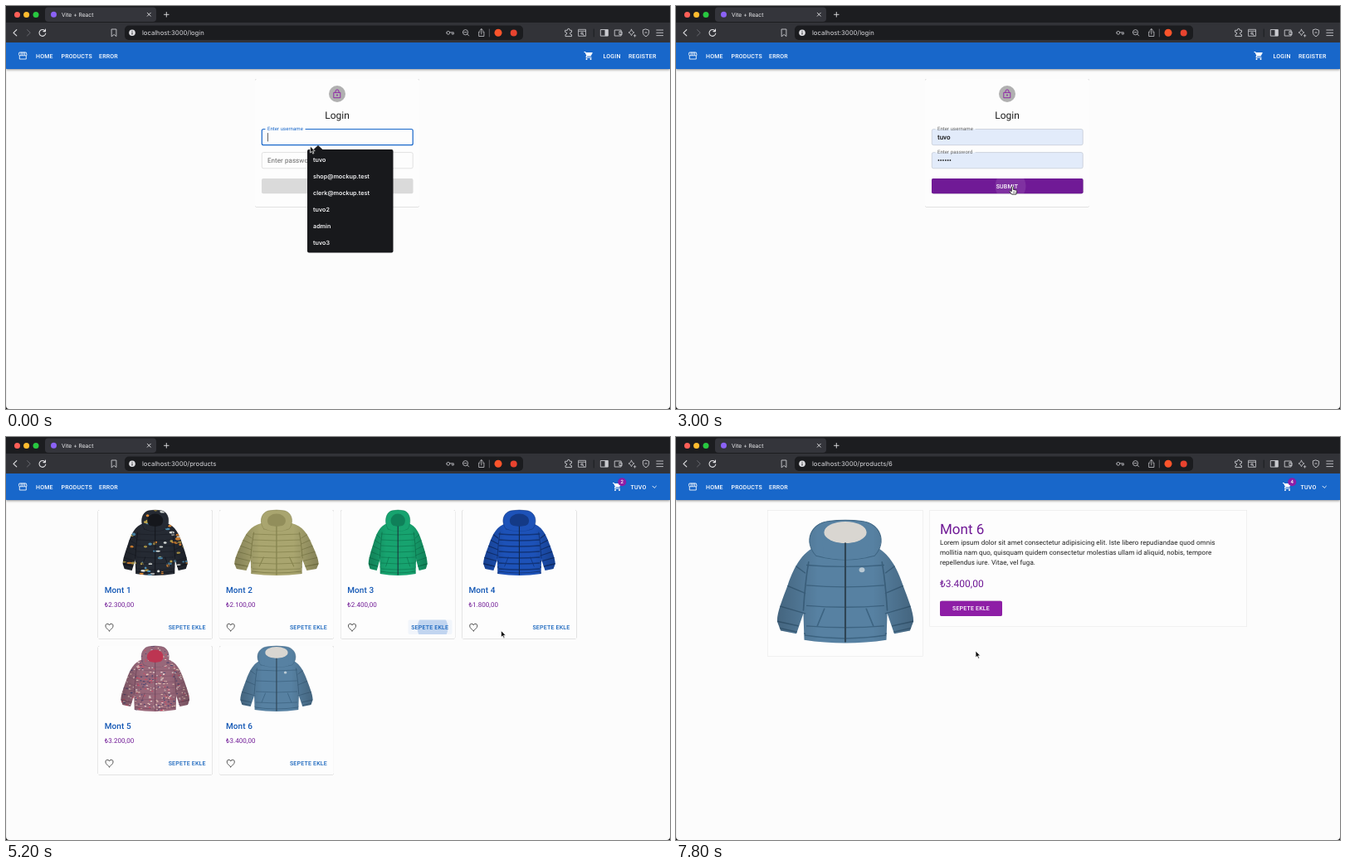
Animation of 800x486 px, one loop 8000 ms. Source, as an HTML page:

```html
<!DOCTYPE html>
<html lang="en">
<head>
<meta charset="utf-8">
<title>Shop walkthrough</title>
<style>
html, body { margin: 0; width: 100%; height: 100%; overflow: hidden; background: #111; }
svg { display: block; width: 100%; height: 100%; font-family: Roboto, "Noto Sans", sans-serif; text-rendering: geometricPrecision; }
.ui { font-family: Inter, "Noto Sans", sans-serif; }
.btn { font-size: 7px; font-weight: 500; letter-spacing: .2px; }
.card { filter: drop-shadow(0 .8px .7px rgba(0,0,0,.42)); }
.bar { filter: drop-shadow(0 1.3px 1.6px rgba(0,0,0,.42)); }
.line { fill: none; stroke-linecap: round; stroke-linejoin: round; }
</style>
</head>
<body>
<svg viewBox="0 0 800 486" preserveAspectRatio="none">
  <defs>
    <linearGradient id="shade">
      <stop offset="0" stop-opacity=".22"/><stop offset=".3" stop-opacity="0"/>
      <stop offset=".7" stop-opacity="0"/><stop offset="1" stop-opacity=".22"/>
    </linearGradient>
    <g id="coats"></g>
  </defs>
  <g id="page"></g>
  <g id="chrome"></g>
  <g id="mouse"></g>
</svg>
<script>
const LOOP = 8000, STEP = 200;
const USER = 'tuvo';
const BLUE = '#1867ca', PURPLE = '#8e1ea6', DEEP = '#701a96';
const $ = id => document.getElementById(id);

// Times of the main events
const AT = { fill: 600, focus: 800, pass: 1800, submit: 2800, shop: 3400, detail: 7600 };
const CLICKS = [[4000, 1, 364], [5000, 2, 514], [5600, 3, 650], [6800, 0, 233]];
const PATH = [
  [0, 366.5, 169], [200, 366.5, 169], [400, 375, 185], [600, 375, 185], [800, 368.5, 194],
  [1600, 368.5, 194], [2400, 405, 217.5], [3000, 405, 217.5], [3600, 353, 192.5],
  [4000, 364, 231], [4200, 364, 231], [4800, 512, 231], [5000, 514, 231], [5200, 596.5, 233.5],
  [5600, 650, 231], [5800, 650, 231], [6600, 233, 233.5], [6800, 233, 233.5],
  [7400, 325, 300], [7600, 325, 300], [7800, 361, 258], [8000, 361, 258]
];

// Drawing helpers
const text = (x, y, s, size, fill, more = '') =>
  `<text x="${x}" y="${y}" font-size="${size}" fill="${fill}" ${more}>${s}</text>`;
const label = (x, y, s, fill, more = '') => text(x, y, s, 7, fill, 'class="btn" ' + more);
const rect = (x, y, w, h, fill, r = 0, more = '') =>
  `<rect x="${x}" y="${y}" width="${w}" height="${h}" rx="${r}" fill="${fill}" ${more}/>`;
const dot = (x, y, r, fill, more = '') => `<circle cx="${x}" cy="${y}" r="${r}" fill="${fill}" ${more}/>`;
const line = (d, stroke, w = 1, more = '') =>
  `<path class="line" d="${d}" stroke="${stroke}" stroke-width="${w}" ${more}/>`;
const shape = (d, fill, more = '') => `<path d="${d}" fill="${fill}" ${more}/>`;
const at = (x, y, s, body) => `<g transform="translate(${x} ${y}) scale(${s})">${body}</g>`;
const MID = 'text-anchor="middle"';
const inside = (p, x, y, w, h) => p.x >= x && p.x <= x + w && p.y >= y && p.y <= y + h;

// Jackets, 80 units high and centred on x = 0
const COATS = [
  { w: 1, hood: 16.5, c: '#252a33', dark: '#14161d', inner: '#15171c', dots: ['#e08a35', '#d9dedb', '#4f8fb4', '#b9a04a'], n: 75, size: 2 },
  { w: 1.3, hood: 19, c: '#a9a56f', dark: '#87844f', inner: '#928e5b' },
  { w: .91, hood: 15, c: '#17a36f', dark: '#0d7850', inner: '#0f8059', zip: '#1d2b38' },
  { w: 1.11, hood: 20, c: '#1d52b8', dark: '#11347a', inner: '#143a86', zip: '#12284f', seam: 1.3 },
  { w: 1.06, hood: 17, c: '#98687a', dark: '#754a60', inner: '#bd3552', dots: ['#efdfda', '#cf4a62', '#4b4672', '#e6c2b4'], n: 480, size: .9 },
  { w: 1.12, hood: 23.5, c: '#5781a2', dark: '#3d6482', inner: '#d9d6d1', zip: '#2f4454', gap: 13, open: 8 }
];
const BODY = 'M-14 16C-24 19-29 29-33 42-36 51-39 59-39 65L-37 71-28 73-24 60-23.5 77Q0 81 23.5 77L24 60 28 73 37 71 39 65C39 59 36 51 33 42 29 29 24 19 14 16Z';

function jacket(k, i) {
  const h = k.hood / k.w, mid = k.open || 13;
  const hood = `M${-h * .8} 23C${-h * 1.15} 14 ${-h * .95} 2 ${-h * .45} .8Q0-.6 ${h * .45} .8C${h * .95} 2 ${h * 1.15} 14 ${h * .8} 23Q0 28 ${-h * .8} 23Z`;
  let seed = 11 + i, spots = '', quilt = '';
  const rnd = () => (seed = seed * 16807 % 2147483647) / 2147483647;
  for (let n = 0; n < (k.n || 0); n++)
    spots += `<ellipse cx="${rnd() * 78 - 39}" cy="${rnd() * 80}" rx="${(.7 + rnd()) * k.size}" ry="${(.5 + rnd() * .4) * k.size}" fill="${k.dots[n % 4]}"/>`;
  for (let y = 29; y < 75; y += k.gap || 7) {
    const out = 25 + (y - 26) * .36;
    quilt += `M-22 ${y}Q0 ${y + 2} 22 ${y}M${-out - 3} ${y}L-23 ${y + 5}M${out + 3} ${y}L23 ${y + 5}`;
  }
  return `<clipPath id="clip${i}"><path d="${BODY}"/><path d="${hood}"/></clipPath>
    <g id="coat${i}" transform="scale(${k.w} 1)">
    ${shape(BODY, k.c)}${shape(hood, k.c)}
    <g clip-path="url(#clip${i})">${spots}
      ${line(quilt, k.dark, k.dots ? .4 : k.seam || .7)}
      ${line('M-21 27Q-23 40-24 58M21 27Q23 40 24 58M-39 65-27 68M39 65 27 68M-23 74Q0 78 23 74', k.dark, .8)}
      ${line('M-12 57-16 68M12 57 16 68', k.dark, .8)}
      ${rect(-39, 0, 78, 80, 'url(#shade)')}
    </g>
    ${line(hood, k.dark, .5)}
    <ellipse cx="0" cy="${mid}" rx="${h * .58}" ry="${k.open ? 7 : 8.5}" fill="${k.inner}"/>
    ${shape(`M${-h * .62} ${mid + 4}Q0 ${mid + 10} ${h * .62} ${mid + 4}L${h * .6} 24Q0 27 ${-h * .6} 24Z`, k.c)}
    ${line(`M0 ${mid + 7}V78`, k.zip || k.dark, 1)}
    ${i === 5 ? dot(9.5, 32, 1.6, '#b9c9d4') : ''}</g>`;
}

// Icons on a 24 unit grid
const CART = 'M7 18a2 2 0 1 0 0 4 2 2 0 0 0 0-4zM1 2v2h2l3.6 7.6-1.4 2.4C4.5 15.3 5.5 17 7 17h12v-2H7.4l1-2h7.5q1.2 0 1.8-1L21.3 5.5Q21.7 4 20.4 4H5.2L4.3 2zm16 16a2 2 0 1 0 0 4 2 2 0 0 0 0-4z';
const HEART = 'M12 20C6 14.8 3 12 3 8.5A4.5 4.5 0 0 1 12 6.5 4.5 4.5 0 0 1 21 8.5C21 12 18 14.8 12 20Z';
const STORE = 'M4 4h16l1.500 6q-.5 2-2.500 2-2 0-2.500-1.500Q16 12 14.300 12 12.500 12 12 10.500 11.500 12 9.700 12 8 12 7.500 10.500 7 12 5 12 3 12 2.500 10zM4 12v8h16v-8M12 4v7M8 4l-.5 7M16 4l.5 7'.replace(/00\b/g, '');

function chrome(url, key) {
  const g = '#c9cacf';
  const glass = (x, y, r) => `M${x - r} ${y}a${r} ${r} 0 1 0 ${2 * r} 0a${r} ${r} 0 1 0 ${-2 * r} 0M${x + r * .7} ${y + r * .7}l2 2`;
  return rect(0, 0, 800, 44, '#323338') + rect(0, 0, 800, 20, '#1c1d20') +
    rect(47, 1.5, 134, 17.5, '#34353b', 4) +
    dot(13.5, 10.5, 3.5, '#ff5f57') + dot(24.6, 10.5, 3.5, '#febc2e') + dot(36, 10.5, 3.5, '#28c840') +
    dot(57.5, 10.3, 3.5, '#8b62f5') +
    text(67, 12.7, 'Vite + React', 6.7, '#eeeef0', 'class="ui"') +
    line('M170.3 8.2l4 4m0-4l-4 4M190.5 10.3h5.6m-2.8-2.8v5.6', '#e2e2e5', .9) +
    rect(143, 23.5, 480, 17.5, '#1b1c1f', 5) +
    line('M12.8 28.7 9 32.3l3.8 3.6', '#e2e2e5', 1.1) +
    line('M25.5 28.7l3.8 3.6-3.8 3.6', '#67686e', 1) +
    line('M46.8 29.8a3.9 3.9 0 1 0 1 3.2M47.5 28v2.6h-2.6', '#e2e2e5', 1.1) +
    line('M127.5 28h5.4v8.6l-2.7-2.2-2.7 2.2z', g, .9) +
    dot(152, 32.3, 3.8, '#dedee2') + line('M152 32v2.2M152 30.3v.1', '#1b1c1f', .9) +
    text(164, 35, 'localhost:3000/' + url, 7.7, '#d8d8dc', 'class="ui"') +
    (key ? line('M530.8 32.3a1.9 1.9 0 1 0 3.8 0a1.9 1.9 0 1 0-3.8 0M534.6 31.8h4.7v2.2h-2v-1.2', g, .8) : '') +
    line(glass(553.5, 31.7, 3.1) + 'M552 31.7h3', g, .8) +
    line('M571 31h-1.3v5.5h6.2V31h-1.3M572.8 34v-6.3m-1.8 1.7 1.8-1.8 1.8 1.8', g, .8) +
    line('M582.3 28v9', '#77787d', .7) +
    dot(593, 32.3, 4.5, '#fb542b') + dot(611.7, 32.5, 4, '#e8432f') +
    line('M674 29.3h2.3q0-2 1.5-2t1.5 2h2.2v2.3q-2 0-2 1.5t2 1.5v2H674v-2.2q1.8 0 1.8-1.4T674 31.5z', g, .9) +
    line('M690 28.3h8.5v8H690zM690 30.3h8.5' + glass(694, 33, 1.2), g, .8) +
    line('M708.2 28v9', '#17181b', .8) +
    line('M716.7 28.5h8.6v7.6h-8.6z', g, .9) + rect(721.5, 28.5, 3.8, 7.6, g) +
    line('M733.6 29h7.5v7h-7.5zM741.1 31h1v3.5h-3.2V31z', g, .9) +
    line('M753.5 28.3q.5 3 3.5 3.7-3 .7-3.5 3.7-.5-3-3.5-3.7 3-.7 3.5-3.7zM757.6 34.5v2.6m-1.3-1.3h2.6', g, .8) +
    line('M771 28l3.6 1.2v3q0 3-3.6 4.6-3.6-1.6-3.6-4.6v-3zM769.8 32h2.4', g, .9) +
    line('M783.8 29h7.8m-7.8 3.3h7.8m-7.8 3.3h7.8', g, .9);
}

function navBar(t) {
  const logged = t >= AT.shop;
  const count = CLICKS.filter(c => t >= c[0] + 200).length;
  let s = `<g class="bar">${rect(0, 44, 800, 32, BLUE)}</g>` +
    at(14.3, 54, .5, line(STORE, '#fff', 1.7)) +
    label(36, 62.5, 'HOME', '#fff') + label(66.5, 62.5, 'PRODUCTS', '#fff') + label(112, 62.5, 'ERROR', '#fff') +
    at(logged ? 730.5 : 696, 54, .5, shape(CART, '#fff'));
  if (!logged) return s + label(719.5, 62.5, 'LOGIN', '#fff') + label(750, 62.5, 'REGISTER', '#fff');
  if (count) s += dot(742.3, 54.2, 5, PURPLE) + text(742.3, 56.4, count, 6, '#fff', MID + ' font-weight="500"');
  return s + label(752.5, 62.5, USER.toUpperCase(), '#fff') + line('M779 59.2l2.2 2.2 2.2-2.2', '#fff', .9);
}

function field(y, name, value, focus, caret) {
  const up = focus || value, x = 308.3, r = 490.2, b = y + 19.2;
  return (value ? rect(x, y, r - x, 19.2, '#e2ebfa', 2) : '') +
    line(`M${up ? 361 : 312} ${y}H${r - 2}q2 0 2 2V${b - 2}q0 2-2 2H${x + 2}q-2 0-2-2V${y + 2}q0-2 2-2H312`,
      focus ? BLUE : value ? '#b9c0cc' : '#cfcfcf', focus ? 1.2 : .6) +
    (up ? text(315, y + 1.6, name, 6, focus ? BLUE : '#666', 'letter-spacing=".06"')
        : text(315, y + 12.4, name, 8, '#666', 'letter-spacing=".07"')) +
    (value ? text(315, y + 12.3, value, 8, '#111', 'font-weight="500"') : '') +
    (caret ? line(`M315.5 ${y + 5}v9.5`, '#222', .7) : '');
}

function ripple(id, x, y, dt, color, alpha, box) {
  if (dt < 0 || dt > 600) return '';
  const fade = dt <= 300 ? 1 : 1 - (dt - 300) / 300;
  return `<clipPath id="${id}">${rect(...box, '#000', 2)}</clipPath>` +
    dot(x, y, 8 + dt * .0525, color, `opacity="${alpha * fade}" clip-path="url(#${id})"`);
}

function login(t, p) {
  const filled = t >= AT.fill, ready = t >= AT.pass, box = [308, 208, 182.5, 18.3];
  const passFocus = t >= AT.focus && t < AT.submit;
  let s = `<g class="card">${rect(300, 88, 198, 154.5, '#fdfdfd', 2)}</g>` +
    dot(399, 106, 10, '#b0b0b0') +
    line('M395.2 104.3h7.6v6.4h-7.6zM397 104.3v-1.3q0-2.1 2-2.1t2 2.1v1.3', PURPLE, .9) + dot(399, 107.5, .9, PURPLE) +
    text(399, 136.2, 'Login', 12, '#1d1d1d', MID) +
    field(148.5, 'Enter username', filled ? USER : '', t < AT.focus, !filled && t < 500) +
    field(176.6, 'Enter password', ready ? '••••••' : '', passFocus, passFocus && !ready && (t - AT.focus) % 1000 < 500);
  s += ready
    ? `<g class="card">${rect(...box, inside(p, ...box) ? DEEP : PURPLE, 2)}</g>` + ripple('rs', 403, 217, t - AT.submit, '#fff', .1, box)
    : rect(...box, '#dadada', 2);
  s += label(399, 219.7, 'SUBMIT', ready ? '#fff' : '#a3a3a3', MID);
  if (!filled) {
    s += rect(363, 173, 103.5, 124.5, '#18191c', 2) + shape('M370 173.5l6-5.5 6 5.5z', '#18191c');
    [USER, 'shop@mockup.test', 'clerk@mockup.test', USER + '2', 'admin', USER + '3'].forEach((v, i) =>
      s += text(370, 188.2 + i * 20, v, 7.2, '#f1f1f3', 'class="ui" font-weight="600"'));
  }
  return s;
}

const PRICES = ['2.300', '2.100', '2.400', '1.800', '3.200', '3.400'];
const cardAt = i => ({ x: 110.7 + i % 4 * 146.25, y: i < 4 ? 88 : 252 });
const buyBox = c => [c.x + 81.3, c.y + 132.5, 53, 17.5];

function products(t, p) {
  return PRICES.map((price, i) => {
    const c = cardAt(i), box = buyBox(c);
    const click = CLICKS.find(k => k[1] === i && t >= k[0] && t < k[0] + 600);
    return `<g class="card">${rect(c.x, c.y, 138, 155.5, '#fdfdfd', 2)}</g>` +
      at(c.x + 69, c.y, 1, `<use href="#coat${i}"/>`) +
      text(c.x + 8, c.y + 99.5, 'Mont ' + (i + 1), 10, '#1156b4', 'font-weight="500" letter-spacing=".075"') +
      text(c.x + 8, c.y + 116.5, `₺${price},00`, 8, DEEP, 'letter-spacing=".05"') +
      at(c.x + 7.8, c.y + 135.8, .5, line(HEART, '#555', 2)) +
      (click || inside(p, ...box) ? rect(...box, BLUE, 2, 'opacity=".05"') : '') +
      (click ? ripple('rb' + i, click[2], c.y + 142, t - click[0], BLUE, .22, box) : '') +
      label(c.x + 85, c.y + 144.3, 'SEPETE EKLE', '#1865bd');
  }).join('');
}

const DETAIL_BTN = [318, 197.7, 75, 18.3];
const LOREM = [
  'Lorem ipsum dolor sit amet consectetur adipisicing elit. Iste libero repudiandae quod omnis',
  'mollitia nam quo, quisquam quidem consectetur molestias ullam id aliquid, nobis, tempore',
  'repellendus iure. Vitae, vel fuga.'
];

function detail() {
  const edge = 'stroke="#e9e9e9" stroke-width=".6"';
  return rect(110.5, 88.3, 187, 176.3, '#fdfdfd', 0, edge) + rect(305.7, 88.3, 382, 140, '#fdfdfd', 0, edge) +
    at(204, 100, 1.88, '<use href="#coat5"/>') +
    text(318, 116.8, 'Mont 6', 17, DEEP) +
    LOREM.map((s, i) => text(318, 130.2 + i * 12, s, 8, '#1d1d1d', 'letter-spacing=".075"')).join('') +
    text(318, 181.3, '₺3.400,00', 12, DEEP) +
    `<g class="card">${rect(...DETAIL_BTN, PURPLE, 2)}</g>` + label(333, 209.3, 'SEPETE EKLE', '#fff');
}

function pointer(t) {
  const n = Math.max(1, PATH.findIndex(k => k[0] > t));
  const [t0, x0, y0] = PATH[n - 1], [t1, x1, y1] = PATH[n];
  const u = (t - t0) / (t1 - t0), e = u * u * (3 - 2 * u);
  return { x: x0 + (x1 - x0) * e, y: y0 + (y1 - y0) * e };
}

function cursorKind(t, p) {
  if (t >= AT.detail) return inside(p, ...DETAIL_BTN) ? 'hand' : 'arrow';
  if (t >= AT.shop) {
    const hit = PRICES.some((_, i) => {
      const c = cardAt(i);
      return inside(p, c.x, c.y, 138, 127) || inside(p, ...buyBox(c));
    });
    return hit ? 'hand' : 'arrow';
  }
  if (t < AT.fill) return 'arrow';
  if (inside(p, 308, 148, 182, 20) || inside(p, 308, 176, 182, 20)) return 'beam';
  return t >= AT.pass && inside(p, 308, 208, 182, 18) ? 'hand' : 'arrow';
}

const CURSORS = {
  arrow: shape('M0 0V8L1.9 6.3 3.2 9.2 4.5 8.6 3.2 5.8H5.7Z', '#111', 'stroke="#fff" stroke-width=".7"'),
  hand: shape('M-.7 .8Q.3-.6 1.3 .8V3.8l3.3.8Q5.7 5 5.6 6L4.9 9.6H-.6L-3.3 6Q-2.8 4.6-.7 6Z', '#fff', 'stroke="#222" stroke-width=".9"') +
    line('M1.7 6.2v1.8M3.3 6.2v1.8', '#222', .5),
  beam: line('M-2-4.5Q0-4.5 0-3.5 0-4.5 2-4.5M0-3.5V3.5M-2 4.5Q0 4.5 0 3.5 0 4.5 2 4.5M-1 .8H1', '#222', .8)
};

function draw(t) {
  const p = pointer(t);
  const shop = t >= AT.shop, one = t >= AT.detail;
  $('page').innerHTML = rect(0, 44, 800, 442, '#fcfcfc') +
    (one ? detail() : shop ? products(t, p) : login(t, p)) + navBar(t) +
    line('M.2 76V486', '#d5d5d5', .5) +
    shape('M0 482V486H4Q0 486 0 482ZM800 482V486H796Q800 486 800 482Z', '#111');
  $('chrome').innerHTML = chrome(one ? 'products/6' : shop ? 'products' : 'login', t < AT.fill || t >= AT.pass);
  $('mouse').innerHTML = at(p.x, p.y, 1, CURSORS[cursorKind(t, p)]);
}

$('coats').innerHTML = COATS.map(jacket).join('');
let begin = null, last = -1;
function tick(now) {
  begin ??= now;
  const t = Math.floor((now - begin) % LOOP / STEP) * STEP;
  if (t !== last) draw(last = t);
  requestAnimationFrame(tick);
}
draw(0);
requestAnimationFrame(tick);
</script>
</body>
</html>
```
